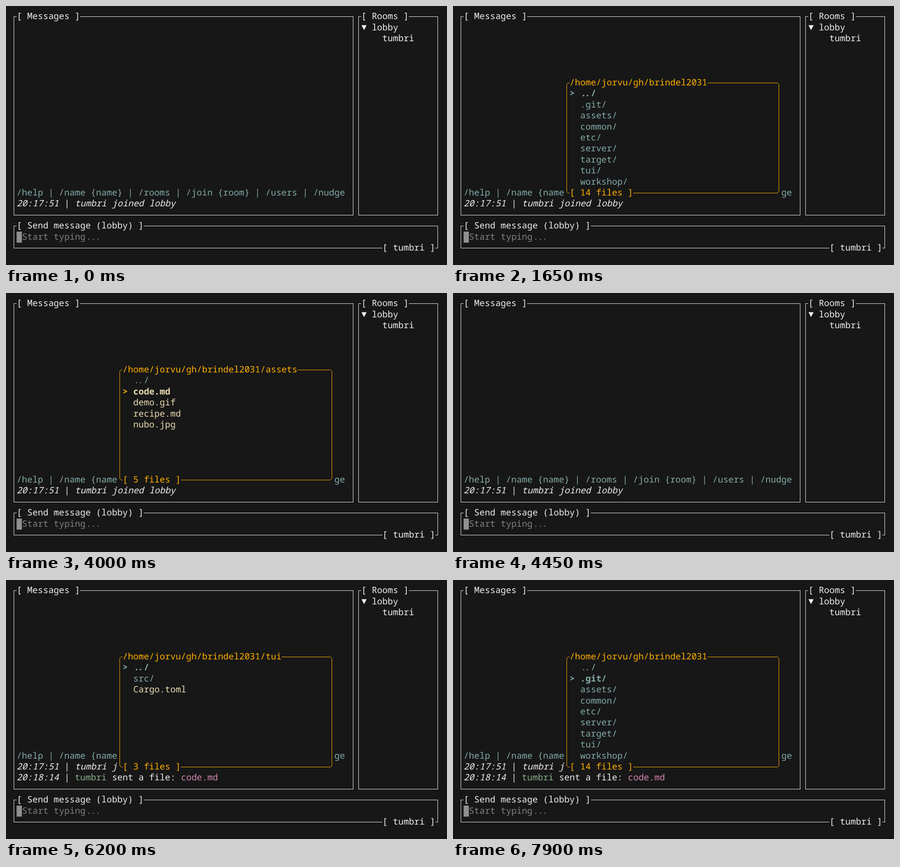
An HTML page that plays this animation: 975 px wide and 574 px high, repeating every 8000 ms.

```html
<!DOCTYPE html>
<html lang="en">
<head>
<meta charset="utf-8">
<title>Terminal chat</title>
<style>
  html, body { margin: 0; width: 100%; height: 100%; overflow: hidden; background: #171717; }
  svg { display: block; width: 100%; height: 100%; }
  text {
    font-family: "Noto Sans Mono", "DejaVu Sans Mono", monospace;
    font-size: 19.53px;
    font-variant-ligatures: none;
    text-rendering: geometricPrecision;
    white-space: pre;
  }
  .bold { font-weight: 700; }
  .italic { font-style: italic; }
</style>
</head>
<body>
<svg id="stage" viewBox="0 0 975 574"></svg>
<script>
const LOOP = 8000;
const CELL = 11.72, ROW = 24.41;
const BG = '#171717', FG = '#eeeeee', TEAL = '#83abaa', AMBER = '#ffaf00',
      CREAM = '#ebdbb2', GREEN = '#87af87', PINK = '#d787af', GREY = '#808080';
const USER = 'tumbri', ROOT = '/home/jorvu/gh/brindel2031';

// Terminal grid: left edge of a column, middle of a column or row
const left = col => 11.7 + col * CELL;
const midX = col => left(col) + CELL / 2;
const midY = row => 24 + row * ROW;
// Border lines fall on whole pixels
const snap = v => Math.floor(v - 0.3) + 0.5;

// Runs of dots sit closer together than the grid
function dotShift(str) {
  const shift = [...str].map(() => 0);
  for (const m of str.matchAll(/\.{2,}/g)) {
    shift[m.index] = 1.6;
    shift[m.index + m[0].length - 1] = -1.6;
  }
  return shift.map((s, i) => s - (i ? shift[i - 1] : 0)).join(' ');
}

function text(col, row, str, fill = FG, style = '') {
  const dx = str.includes('..') ? ` dx="${dotShift(str)}"` : '';
  return `<text x="${left(col).toFixed(2)}" y="${(midY(row) + 5.4).toFixed(2)}" fill="${fill}"${dx} class="${style}">${str.replace(/>/g, '&gt;')}</text>`;
}
const italic = (col, row, str) => text(col, row, str, FG, 'italic');

const rect = (x, y, w, h, fill) =>
  `<rect x="${x}" y="${y}" width="${w}" height="${h}" fill="${fill}"/>`;

// Labels interrupt the border: { col, row, str }
function frame(c1, r1, c2, r2, color, radius, labels) {
  const x = snap(midX(c1)), y = snap(midY(r1));
  let out = `<rect x="${x}" y="${y}" width="${snap(midX(c2)) - x}" height="${snap(midY(r2)) - y}" rx="${radius}" fill="none" stroke="${color}"/>`;
  for (const { col, row, str } of labels) {
    out += rect(left(col), midY(row) - 3, str.length * CELL, 6, BG) + text(col, row, str, color);
  }
  return out;
}

function messages(sent) {
  const top = sent ? 15 : 16;
  let out = text(1, top, '/help | /name {name} | /rooms | /join {room} | /users | /nudge', TEAL)
    + italic(1, top + 1, '20:17:51') + text(10, top + 1, '|')
    + italic(12, top + 1, USER + ' joined lobby');
  if (sent) {
    out += italic(1, 17, '20:18:14') + text(10, 17, '|')
      + text(12, 17, USER, GREEN) + text(19, 17, 'sent a file:')
      + text(32, 17, 'code.md', PINK);
  }
  return out;
}

function base() {
  const y = midY(1);
  return frame(0, 0, 64, 18, FG, 0, [{ col: 1, row: 0, str: '[ Messages ]' }])
    + frame(65, 0, 80, 18, FG, 0, [{ col: 66, row: 0, str: '[ Rooms ]' }])
    + frame(0, 19, 80, 21, FG, 0, [
        { col: 1, row: 19, str: '[ Send message (lobby) ]' },
        { col: 70, row: 21, str: `[ ${USER} ]` }])
    + `<path d="M785.9 ${y - 6}h11.4l-5.7 11.2z" fill="${FG}"/>`
    + text(68, 1, 'lobby') + text(70, 2, USER)
    + rect(left(1), midY(20) - ROW / 2, CELL, ROW, '#909090')
    + text(2, 20, 'Start typing...', GREY);
}

const dirs = {
  tui: { path: ROOT + '/tui', count: 3, items: ['../', 'src/', 'Cargo.toml'] },
  root: {
    path: ROOT, count: 14,
    items: ['../', '.git/', 'assets/', 'common/', 'etc/', 'server/', 'target/', 'tui/', 'workshop/']
  },
  assets: {
    path: ROOT + '/assets', count: 5,
    items: ['../', 'code.md', 'demo.gif', 'recipe.md', 'nubo.jpg']
  }
};

function explorer(dir, selected) {
  const top = midY(6) - ROW / 2;
  let out = rect(left(20), top, 41 * CELL, 11 * ROW, BG)
    + frame(20, 6, 60, 16, AMBER, 4.5, [
        { col: 21, row: 6, str: dir.path },
        { col: 21, row: 16, str: `[ ${dir.count} files ]` }]);
  dir.items.forEach((name, i) => {
    const isDir = name.endsWith('/'), on = i === selected;
    const style = on ? 'bold' : '';
    if (on) out += text(21, 7 + i, '>', isDir ? TEAL : AMBER, style);
    out += text(23, 7 + i, name, isDir ? TEAL : CREAM, style);
  });
  return out;
}

// Start time, open folder, selected entry, whether the file has been sent
const steps = [
  { at: 0 },
  { at: 900, dir: 'tui', sel: 0 },
  { at: 1650, dir: 'root', sel: 0 },
  { at: 2450, dir: 'root', sel: 1 },
  { at: 2600, dir: 'root', sel: 2 },
  { at: 3150, dir: 'assets', sel: 0 },
  { at: 4000, dir: 'assets', sel: 1 },
  { at: 4450 },
  { at: 4500, sent: true },
  { at: 6200, dir: 'tui', sel: 0, sent: true },
  { at: 7250, dir: 'root', sel: 0, sent: true },
  { at: 7900, dir: 'root', sel: 1, sent: true }
];

const stage = document.getElementById('stage');
const chrome = base();
let shown = null;

function draw(t) {
  const step = steps.filter(s => s.at <= t).pop();
  if (step === shown) return;
  shown = step;
  stage.innerHTML = rect(0, 0, 975, 574, BG) + chrome + messages(step.sent)
    + (step.dir ? explorer(dirs[step.dir], step.sel) : '');
}

const start = performance.now();
function tick() {
  draw((performance.now() - start) % LOOP);
  requestAnimationFrame(tick);
}
tick();
</script>
</body>
</html>
```
